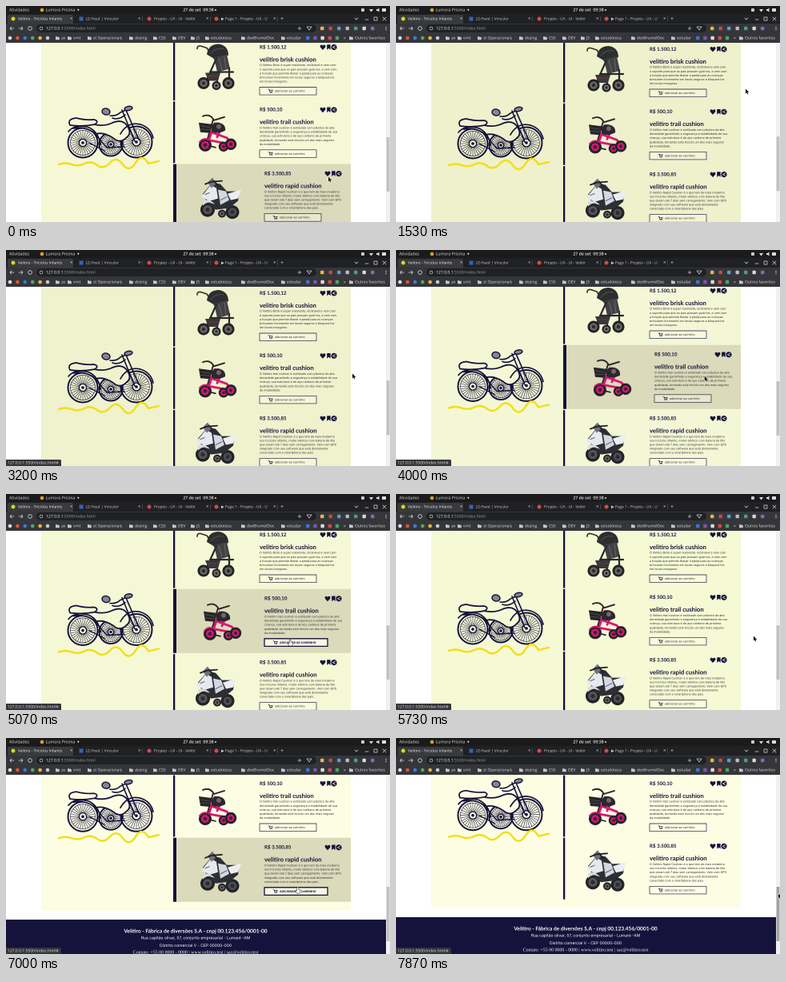
An HTML page with a canvas for the animation above (8000 ms loop, 480 by 270 pixels).

```html
<!DOCTYPE html>
<html lang="pt-BR">
<head>
<meta charset="utf-8">
<style>
html, body { margin: 0; width: 100%; height: 100%; overflow: hidden; background: #fff; }
canvas { display: block; width: 480px; height: 270px; }
</style>
</head>
<body>
<canvas id="stage" width="960" height="540"></canvas>
<script>
const ctx = document.getElementById('stage').getContext('2d');
const LOOP = 8000, PITCH = 78.3, NAVY = '#15123c';
const SANS = '"Open Sans", sans-serif', BODY = 'Inter, sans-serif', HEAD = 'Lato, sans-serif';
const SERIF = '"Liberation Serif", serif';

// Tracks: time, then values
const POINTER = [
  [0, 403, 216], [120, 403, 214], [600, 404, 150], [950, 410, 82], [1200, 436, 95], [1530, 437, 106],
  [1950, 404, 56], [2350, 372, 106], [2650, 402, 133], [2850, 433, 146], [3200, 433, 157],
  [3700, 404, 131], [4250, 372, 182], [4700, 356, 185], [5150, 355, 185], [5380, 440, 184],
  [5730, 447, 180], [6070, 450, 185], [6550, 404, 136], [6950, 362, 189], [7400, 436, 192],
  [7800, 478, 197], [8000, 478, 197]
];
const SCROLL = [[0, 51.5], [300, 51.5], [900, 54], [3300, 54], [3900, 51], [5780, 51], [6040, -21.3], [8000, -21.3]];
const PAPER = [[0, 245, 247, 213], [900, 238, 241, 203], [3300, 239, 242, 205], [3900, 244, 247, 213],
  [5780, 245, 249, 212], [6040, 252, 253, 226], [8000, 252, 253, 226]];

const ITEMS = [
  { price: 'R$ 1.500,12', name: 'velitiro brisk cushion', photo: stroller, text: [
    'O Velitiro Brisk é super resistente, reclinável e vem com',
    'o suporte para que os pais possam guiá-los, e vem com',
    'a função que permite liberar o pedal para as crianças',
    'brincarem livremente em locais seguros e bloqueá-los',
    'em locais inseguros.'] },
  { price: 'R$ 500,10', name: 'velitiro trail cushion', photo: trike, text: [
    'O Velitiro trail cushion é estilizado com plástico de alta',
    'densidade garantindo a segurança e estabilidade de sua',
    'criança, sua estrutura é de aço carbono de primeira',
    'qualidade, tornando este triciclo um dos mais seguros',
    'da modalidade.'] },
  { price: 'R$ 3.500,85', name: 'velitiro rapid cushion', photo: motorbike, text: [
    'O Velitiro Rapid Cushion é o que tem de mais moderno',
    'nos triciclos infantis, motor elétrico com bateria de lítio',
    'que duram até 7 dias sem carregamento. Vem com GPS',
    'integrado com seu software que está diretamente',
    'conectado com o smartphone dos pais.'] }
];

function at(track, t) {
  let i = 1;
  while (i < track.length - 1 && track[i][0] < t) i++;
  const a = track[i - 1], b = track[i];
  let p = Math.min(1, Math.max(0, (t - a[0]) / (b[0] - a[0])));
  p = p * p * (3 - 2 * p);
  return a.slice(1).map((v, k) => v + (b[k + 1] - v) * p);
}

function box(x, y, w, h, fill, r = 0) {
  ctx.fillStyle = fill;
  ctx.beginPath();
  ctx.roundRect(x, y, w, h, r);
  ctx.fill();
}

function disc(x, y, r, fill) {
  ctx.fillStyle = fill;
  ctx.beginPath();
  ctx.arc(x, y, r, 0, 7);
  ctx.fill();
}

function ring(x, y, r, color, w) {
  ctx.strokeStyle = color;
  ctx.lineWidth = w;
  ctx.beginPath();
  ctx.arc(x, y, r, 0, 7);
  ctx.stroke();
}

function fill(d, color) {
  ctx.fillStyle = color;
  ctx.fill(new Path2D(d));
}

function line(d, color, w) {
  ctx.strokeStyle = color;
  ctx.lineWidth = w;
  ctx.stroke(new Path2D(d));
}

function text(s, x, y, size, color, family = SANS, weight = 400, align = 'left') {
  ctx.font = `${weight} ${size}px ${family}`;
  ctx.fillStyle = color;
  ctx.textAlign = align;
  ctx.fillText(s, x, y);
}

function shifted(x, y, draw) {
  ctx.save();
  ctx.translate(x, y);
  draw();
  ctx.restore();
}

function wheel(x, y, r, rim) {
  disc(x, y, r, '#232326');
  disc(x, y, r * .62, rim);
  disc(x, y, r * .3, '#2c2c30');
}

function stroller() {
  line('M239 2Q239-3 245-1L251 1L263 18', '#37302f', 1.7);
  fill('M251 9Q253-4 266-4Q278-2 278 10L263 16Z', '#2d2e2f');
  line('M256 8Q262 0 272 2', '#5c5d5c', .7);
  fill('M260 13L276 9L280 27L264 31Z', '#414244');
  line('M266 14L270 28M273 12L275 27', '#77706c', .8);
  line('M263 14L250 43M279 26L279 43M255 31L284 31M266 31L263 47', '#29292b', 2.2);
  fill('M249 32L268 32L265 42L253 42Z', '#38383a');
  line('M252 36L266 36', '#8d3434', .8);
  wheel(247, 45, 7.5, '#6a6866');
  wheel(263, 48, 5.5, '#777');
  wheel(278, 45, 7.5, '#6a6866');
}

function trike() {
  const pink = '#d81674';
  line('M246 8Q255 4 260 13L273 9M259 12L250 43', '#292629', 1.9);
  line('M261 17L252 42M254 27L276 35L282 42M268 25L264 34M254 38L275 42', pink, 2.8);
  fill('M241 16L257 18L255 29L243 28Z', '#262528');
  line('M243 20L255 22M243 24L255 25', '#5f5d60', .6);
  fill('M257 22Q258 15 266 16Q275 18 274 26Q264 31 257 27Z', '#2b282c');
  disc(266, 21, 3, '#77626d');
  wheel(249, 44, 8, pink);
  wheel(272, 46, 6.2, pink);
  wheel(281, 43, 7.2, pink);
  line('M242 40Q248 33 256 39', pink, 1.8);
  line('M254 45L262 47', '#222', 1.6);
}

function motorbike() {
  wheel(246, 45, 9, '#55565c');
  wheel(277, 48, 8.5, '#4d4e55');
  wheel(264, 50, 5, '#666');
  fill('M240 25L252 11L262 13L270 22L286 22L284 34L273 43L256 45L245 35Z', '#2d2e36');
  fill('M238 29L250 14L257 18L259 31L249 34Z', '#e7e9ef');
  fill('M259 20L269 22L273 33L262 39Z', '#d5d8e0');
  fill('M271 25L288 20L284 31L275 33Z', '#eceef2');
  fill('M240 34Q247 30 255 38L251 37Q246 34 240 40Z', '#d9dbe1');
  fill('M246 11L252 5L257 12L251 18Z', '#6d7078');
  line('M243 13L251 10L264 9M254 9L259 15', '#202126', 1.8);
  line('M243 26L248 24M262 33L270 29', '#6b748c', 1.2);
}

function spokes(x, y, r) {
  ring(x, y, r, NAVY, 2);
  ring(x, y, r * .84, NAVY, .6);
  ring(x, y, r * .25, NAVY, 1.3);
  for (let i = 0; i < 28; i++) {
    const a = i * Math.PI / 14, c = Math.cos(a), s = Math.sin(a);
    line(`M${x + c * r * .27} ${y + s * r * .27}L${x + c * r * .84} ${y + s * r * .84}`, NAVY, .55);
  }
  disc(x, y, 1.8, NAVY);
}

// Hand-drawn trike, y measured from the first price line
function sketch(paper) {
  spokes(131, 121, 14.5);
  spokes(96, 119, 18.5);
  spokes(163, 118, 19.5);
  const body = 'M84 101Q94 94 110 96Q123 99 133 94Q145 89 151 97Q158 107 151 112Q143 121 134 113Q122 105 112 108Q100 98 84 101Z';
  fill(body, paper);
  line(body, NAVY, 1.8);
  const seat = 'M80 97Q76 89 88 88Q99 91 110 90Q117 92 111 96Q96 99 80 97Z';
  fill(seat, paper);
  line(seat, NAVY, 1.7);
  line('M78 105Q86 95 104 100Q116 106 118 121M143 108Q152 92 168 96Q181 100 184 113', NAVY, 1.7);
  line('M145 78L161 117M149 76L166 115M130 85Q138 86 143 81L157 75M133 88Q141 91 149 84', NAVY, 1.6);
  line('M112 109L126 125L148 124M104 119L123 129', NAVY, 1.4);
  const lamp = new Path2D();
  lamp.ellipse(125, 80, 5, 4, .2, 0, 7);
  lamp.moveTo(158, 75);
  lamp.ellipse(153, 76, 5, 2.6, -.2, 0, 7);
  ctx.fillStyle = '#858790';
  ctx.fill(lamp);
  ctx.stroke(lamp);
  line('M66 146Q74 143 82 146T98 145T114 147T130 144T146 146T162 144T178 145L191 142', '#f1df18', 2.4);
}

function icons(x) {
  fill(`M${x} 3.4L${x - 3.2} 0Q${x - 4}-3 ${x - 1.6}-3Q${x - .4}-3 ${x}-1.7Q${x + .4}-3 ${x + 1.6}-3Q${x + 4}-3 ${x + 3.2} 0Z`, NAVY);
  fill(`M${x + 5.2}-3.3h4.4v6.6l-2.2-2l-2.2 2Z`, NAVY);
  disc(x + 14, 0, 3.6, NAVY);
  line(`M${x + 15.6}-1.6L${x + 12.4} 0L${x + 15.6} 1.6`, '#f2f3dc', .7);
}

function cart(x, y) {
  line(`M${x} ${y - 1.8}h1l1 3h2.4l.8-2.2h-3.8`, NAVY, .7);
  disc(x + 2.2, y + 2.1, .5, NAVY);
  disc(x + 4.2, y + 2.1, .5, NAVY);
}

function item(data, y, hover, [px, py]) {
  const dx = 6 * hover, pad = 1.5 * hover, x = 317 + dx;
  if (hover) {
    ctx.globalAlpha = hover;
    box(209, y - 10.5 - pad, 222, 77 + 2 * pad, '#dbdaba');
    ctx.globalAlpha = 1;
  }
  box(209, y - 10.5 - pad, 2.3 + 1.7 * hover, 77 + 2 * pad, NAVY);
  shifted(dx, y, data.photo);
  text(data.price, x, y, 6.2, NAVY, HEAD, 700);
  text(data.name, x, y + 15.5, 7.7, NAVY, HEAD, 700);
  data.text.forEach((s, i) => text(s, x, y + 22.6 + 5.1 * i, 3.65, '#34333c', BODY));
  shifted(0, y, () => icons(396 + dx));

  const active = hover > .4 && px > x && px < x + 71 && Math.abs(py - y - 55) < 6;
  const w = active ? 79 : 71;
  ctx.strokeStyle = NAVY;
  ctx.lineWidth = active ? 1.3 : .65;
  box(x, y + 50, w, 9.6, active ? '#f7f8e4' : 'rgba(255,255,235,.35)');
  ctx.stroke();
  cart(x + 11, y + 54.7);
  if (active) text('ADICIONAR AO CARRINHO', x + 19, y + 55, 3.5, NAVY, BODY, 700);
  else text('adicionar ao carrinho', x + 19, y + 55, 3.75, '#34333c', BODY);
  return active || (hover > .4 && px > 398 && px < 421 && Math.abs(py - y) < 5);
}

function inside(t, i) {
  const [x, y] = at(POINTER, t), top = at(SCROLL, t)[0] - 10.5 + PITCH * i;
  return x > 209 && x < 431 && y > top && y < top + PITCH;
}

// Share of the last 250 ms that the pointer spent on the item
function hoverOf(t, i) {
  let n = 0;
  for (let k = 0; k < 10; k++) n += inside(Math.max(0, t - k * 25), i);
  return n / 10;
}

function footer(y) {
  box(0, y, 475, 60, NAVY);
  const row = (s, dy, size, family, weight) => text(s, 237, y + dy, size, '#fff', family, weight, 'center');
  row('Velitiro - Fábrica de diversões S.A - cnpj 00.123.456/0001-00', 14.3, 6.6, HEAD, 700);
  row('Rua capitão olivar, 57, conjunto empresarial - Lumaré -AM', 22.8, 5, BODY);
  row('Distrito comercial V - CEP 00000-000', 32.6, 5, BODY);
  row('Contato: +55 00 0000 - 0000 | www.velitiro.test | sac@velitiro.test', 41, 5.9, SERIF);
}

function browser() {
  box(0, 0, 480, 10, '#1b1b1b');
  text('Atividades', 4, 5, 5.2, '#e4e4e4');
  disc(45, 5, 2.3, '#d9a32b');
  text('Lumora Prisma  ▾', 49.5, 5, 5.2, '#e4e4e4');
  text('27 de set  09:38', 240.5, 5, 5.2, '#eee', SANS, 600, 'center');
  disc(262, 5, 1, '#ddd');
  box(444, 3, 4, 4, '#ccc', 1);
  fill('M454 4h5l-2.5 3.5Z', '#ddd');
  fill('M463 4h1.5l2-1.5v5l-2-1.5H463Z', '#ddd');
  box(470, 3, 5, 4, '#ddd', .6);

  box(0, 10, 480, 12, '#202124');
  box(2, 11, 82, 12, '#393a3e', 2);
  const tabs = [[9, '#d9d51c', 'Velitiro - Triciclos Infantis'], [94, '#3564b2', '(2) Feed | Vinculor'],
    [179, '#d84848', 'Projeto - UX - UI - Velitir'], [263, '#d84848', '▶ Page 1 - Projeto - UX - U']];
  tabs.forEach(([x, color, s], i) => {
    if (i === 1) box(x - 2.5, 13.5, 5, 5, color);
    else disc(x, 16, 2.5, color);
    text(s, x + 6, 16, 4.8, i ? '#cfcfcf' : '#f4f4f4');
    text('×', x + 71, 16, 6, '#ddd');
    if (i) box(x + 76.5, 13, .5, 6, '#66676a');
  });
  text('+', 343, 16, 7, '#ddd');
  line('M436 15l2 2l2-2M449 17h4M460 14h4v4h-4ZM471 14l4 4M475 14l-4 4', '#ddd', .7);

  box(0, 22, 480, 24, '#35363a');
  line('M10 28H5l2-2M5 28l2 2M16 28h5l-2-2M21 28l-2 2', '#d5d5d5', .8);
  ring(30, 28, 2.3, '#ddd', .8);
  box(38, 23, 350, 10, '#202124', 5);
  ring(44, 28, 1.9, '#ccc', .7);
  text('127.0.0.1', 50, 28, 5.1, '#fff');
  const hostWidth = ctx.measureText('127.0.0.1').width;
  text(':5500/index.html', 50 + hostWidth, 28, 5.1, '#a0a2a6');
  line('M367 26v4M365 28h4M376 26l3 4l3-4Z', '#ccc', .7);
  ['#e8b63d', '#c94a3e', '#5a9bd8', '#bbb', '#4da368', '#d8d8d8', '#8b66b8'].forEach((c, i) =>
    box(393 + i * 10.5, 25.8, 4.4, 4.4, c, 1));
  [0, 1.7, 3.4].forEach(d => disc(475, 26.3 + d, .6, '#ddd'));

  ['#ddd', '#d95446', '#3f7bd0', '#55a964', '#e5b63f', '#c9c9c9'].forEach((c, i) => disc(5 + i * 9.4, 40, 2.3, c));
  const marks = [[69, 'ax'], [84, 'vrnt'], [109, 'st Operacionais'], [161, 'desing'], [191, 'CSS'], [215, 'DEV'],
    [238, 'JS'], [256, 'estudoteca'], [301, 'devBrumelDoc'], [351, 'estudar'], [436, 'Outros favoritos']];
  marks.forEach(([x, s]) => {
    box(x - 7, 38.2, 2.4, 1.5, '#c4c6ca');
    box(x - 7, 38.8, 4.8, 3.5, '#c4c6ca', .5);
    text(s, x, 40, 5, '#e6e6e6');
  });
  ['#3d77d2', '#7d57b0', '#ddd', '#d64a40', '#4da368'].forEach((c, i) => box(375 + i * 9.2, 37.8, 4.4, 4.4, c, 1));
  text('»', 422, 40, 5.5, '#ddd');
}

function pointer(x, y, hand) {
  shifted(x, y, () => {
    const d = hand ? 'M-.7-2.5h1.4v2.6l2.3.7v2.4l-.8 1.6h-3.2l-1.8-2.6l.6-.6l1.5.9Z'
      : 'M0-2.5v6l1.4-1.2l1 2.2l1-.5l-1-2h1.9Z';
    line(d, hand ? '#111' : '#fff', .9);
    fill(d, hand ? '#fff' : '#111');
  });
}

function draw(t) {
  const [base] = at(SCROLL, t), cursor = at(POINTER, t);
  const paper = `rgb(${at(PAPER, t).map(Math.round)})`;
  const hovers = ITEMS.map((_, i) => hoverOf(t, i));
  const grow = 3 * hovers.reduce((a, b) => a + b);

  box(0, 0, 480, 270, '#fff');
  box(44, 46, 387, base + 188 + grow, paper);
  shifted(0, base + grow / 2 - 1, () => sketch(paper));
  let y = base, hand = false;
  ITEMS.forEach((data, i) => {
    const pad = 1.5 * hovers[i];
    hand = item(data, y + pad, hovers[i], cursor) || hand;
    y += PITCH + 2 * pad;
  });
  footer(base + 245.3 + grow);

  box(475, 46, 5, 224, '#f1f1f1');
  box(475.6, 164 + (51.5 - base) * .302, 3.8, 68, t > 7700 ? '#a2a2a2' : '#c1c1c1');
  browser();
  if ((t > 1900 && t < 5950) || t > 6500) {
    box(0, 262, 69, 8, '#35363a', [0, 1.5, 0, 0]);
    text('127.0.0.1:5500/index.html#', 2, 266.2, 5, '#e4e4e4');
  }
  pointer(cursor[0], cursor[1], hand);
}

ctx.scale(2, 2);
ctx.textBaseline = 'middle';
ctx.textRendering = 'geometricPrecision';
ctx.lineJoin = ctx.lineCap = 'round';
const start = performance.now();
function tick(now) {
  draw(Math.max(0, now - start) % LOOP);
  requestAnimationFrame(tick);
}
tick(start);
</script>
</body>
</html>
```
